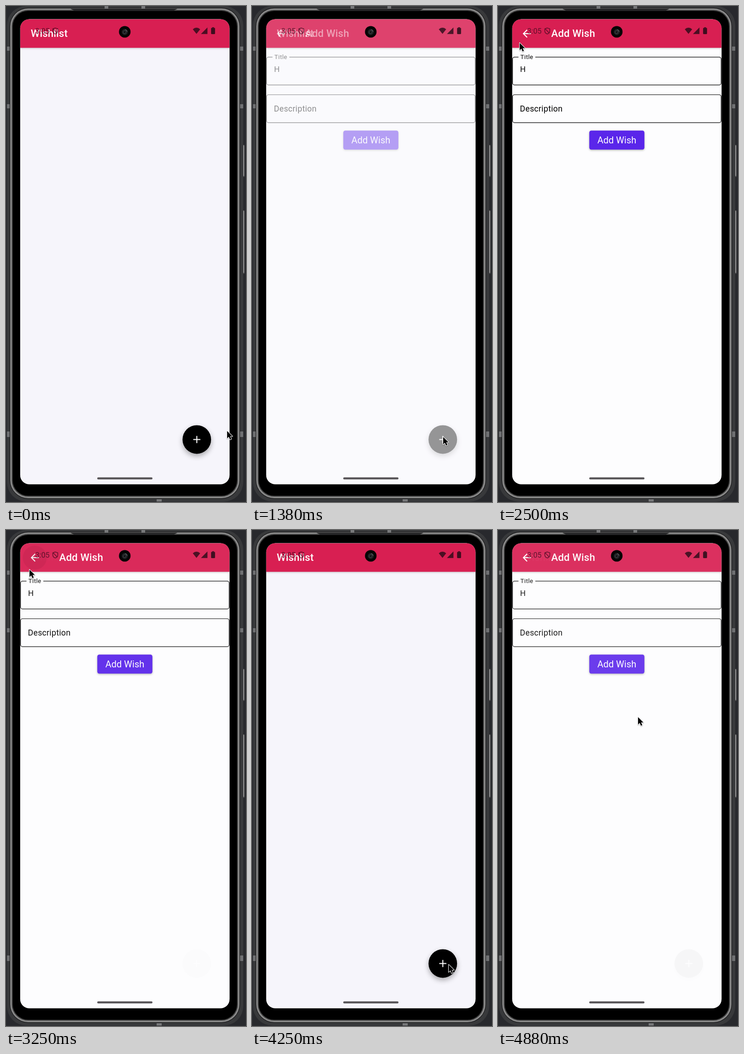
An HTML page with a canvas for the animation above (5.01 s loop, 521 by 1076 pixels).

```html
<!DOCTYPE html>
<html lang="en">
<head>
<meta charset="utf-8">
<title>Wishlist</title>
<style>
html, body { margin: 0; width: 100%; height: 100%; overflow: hidden; background: #28292d; }
canvas { display: block; width: 521px; height: 1076px; }
</style>
</head>
<body>
<canvas id="stage" width="521" height="1076"></canvas>
<script>
const W = 521, H = 1076, LOOP = 5010;
const PINK = '#d81f52';
const SCREEN = { x: 30.8, y: 28.5, w: 454.5, h: 1009, r: 20 };
const ctx = document.getElementById('stage').getContext('2d');

function layer(draw) {
  const c = document.createElement('canvas');
  c.width = W;
  c.height = H;
  draw(c.getContext('2d'));
  return c;
}

function box(g, x, y, w, h, r, fill) {
  g.beginPath();
  g.roundRect(x, y, w, h, r);
  if (fill) {
    g.fillStyle = fill;
    g.fill();
  }
}

function disc(g, x, y, r, fill) {
  g.beginPath();
  g.arc(x, y, r, 0, Math.PI * 2);
  g.fillStyle = fill;
  g.fill();
}

function text(g, str, x, y, size, color, weight = 400, spacing = 0) {
  g.font = `${weight} ${size}px Roboto, sans-serif`;
  g.letterSpacing = spacing + 'px';
  g.fillStyle = color;
  g.fillText(str, x, y);
}

function shadow(g, color, blur, dy) {
  g.shadowColor = color;
  g.shadowBlur = blur;
  g.shadowOffsetY = dy;
}

function icon(g, path, x, y, scale, color) {
  g.save();
  g.translate(x, y);
  g.scale(scale, scale);
  g.fillStyle = color;
  g.fill(new Path2D(path));
  g.restore();
}

// Metal rim, from the outside in: inset from the side, colour
const RIM = [
  [0, '#161617'], [1, '#6c6c6c'], [2, '#979797'], [3.5, '#7a7a7a'],
  [4.5, '#4c4c4c'], [6, '#1f1f1f'], [7, '#000']
];

// Phone hardware around the screen
const phone = layer(g => {
  g.fillStyle = '#28292d';
  g.fillRect(0, 0, W, H);
  for (const [y, h] of [[301, 70], [443, 138]]) {
    box(g, 513, y, 5, h, 2, '#4d4d4e');
    box(g, 514, y + 1, 3, h - 3, 1.5, '#929292');
  }
  box(g, 2, 0, 513, 1075, 42, '#38393b');
  for (const [y, h] of [[88, 9], [213, 9], [923, 12]]) {
    box(g, 2, y, 7, h, 0, '#6f7072');
    box(g, 508, y, 7, h, 0, '#6f7072');
  }
  for (const [inset, color] of RIM) {
    const dx = 8 + inset, dy = 4 + inset;
    box(g, dx, dy, 516 - dx * 2, 1073 - dy * 2, 40 - inset, color);
  }
  box(g, 214, 0, 8, 7, 0, '#77787a');
  box(g, 294, 0, 8, 7, 0, '#77787a');
  box(g, 327, 1070, 11, 5, 0, '#77787a');
  g.beginPath();
  g.moveTo(140, 6);
  g.lineTo(372, 6);
  g.lineTo(362, 11);
  g.lineTo(150, 11);
  g.fillStyle = '#242426';
  g.fill();
});

function appBar(g, bg) {
  g.fillStyle = bg;
  g.fillRect(SCREEN.x, SCREEN.y, SCREEN.w, SCREEN.h);
  g.save();
  shadow(g, 'rgba(0,0,0,.2)', 4, 1.2);
  g.fillStyle = PINK;
  g.fillRect(SCREEN.x, SCREEN.y, SCREEN.w, 62.2);
  g.restore();
}

const listPage = layer(g => {
  appBar(g, '#f6f5fb');
  text(g, 'Wishlist', 53.8, 67, 22.1, '#fff', 500, 0.16);
  g.save();
  shadow(g, 'rgba(0,0,0,.32)', 12, 5);
  disc(g, 414.2, 940.4, 31, '#000');
  g.restore();
  g.fillStyle = '#fff';
  g.fillRect(406.5, 939.4, 15.5, 2.1);
  g.fillRect(413.2, 932.7, 2.1, 15.5);
});

function field(g, y) {
  box(g, 31.6, y, 452.8, 60.6, 4.4);
  g.strokeStyle = '#000';
  g.lineWidth = 1.2;
  g.stroke();
}

const BACK = 'M20 11H7.83l5.59-5.59L12 4l-8 8 8 8 1.41-1.41L7.83 13H20v-2z';

const addPage = layer(g => {
  appBar(g, '#fdfdfe');
  icon(g, BACK, 49.2, 46.7, 1.105, '#fff');
  text(g, 'Add Wish', 115.6, 67, 22.1, '#fff', 500, 0.16);
  field(g, 110.8);
  g.fillStyle = '#fdfdfe';
  g.fillRect(44.5, 108, 36.5, 6);
  text(g, 'Title', 48.6, 114.7, 13.3, '#000', 400, 0.44);
  text(g, 'H', 48, 142.8, 16.8, '#000');
  field(g, 192.5);
  text(g, 'Description', 47.6, 229, 17.7, '#000', 400, 0.28);
  g.save();
  shadow(g, 'rgba(0,0,0,.3)', 4, 1.5);
  box(g, 198.2, 270.3, 119.6, 41.2, 4.4, '#5a26ea');
  g.restore();
  text(g, 'Add Wish', 215.8, 298, 19.9, '#fff', 400, 0.05);
});

function statusBar(g) {
  const dark = 'rgba(30,6,18,.64)';
  text(g, '3:05', 63.5, 59.6, 16.2, dark);
  g.strokeStyle = dark;
  g.lineWidth = 1.5;
  g.stroke(new Path2D('M107 47.6l5.4 2v4.6q0 4.6-5.4 6.6q-5.4-2-5.4-6.6v-4.6zM102.5 49.5l9 9.5'));
  g.fillStyle = 'rgba(20,8,16,.72)';
  g.fill(new Path2D('M405.5 50.4Q413.5 43.6 421.5 50.4L413.5 60.6z'));
  g.fill(new Path2D('M437.3 46.6V60.8H423.2z'));
  box(g, 445.2, 47.6, 8.6, 13.4, 1.4, 'rgba(20,8,16,.78)');
  g.fillRect(447.6, 46, 3.8, 1.6);
}

function camera(g) {
  disc(g, 257.8, 56, 12.6, '#050505');
  disc(g, 257.8, 56.4, 6.6, '#1d1e20');
  disc(g, 257.2, 57, 4.2, '#2e2f33');
  g.strokeStyle = '#5b5c60';
  g.lineWidth = 1.5;
  g.beginPath();
  g.arc(257.8, 56.4, 5, -1.5, -0.1);
  g.stroke();
  disc(g, 257.4, 56.6, 1.8, '#0d0d0f');
}

function cursor(g, x, y) {
  g.save();
  g.translate(x + 1, y + 1);
  const p = new Path2D('M0 0V16L3.7 12.6L6.3 18.6L9.2 17.3L6.6 11.5H11.6z');
  shadow(g, 'rgba(0,0,0,.35)', 2, 1);
  g.lineJoin = 'round';
  g.lineWidth = 2;
  g.strokeStyle = '#fff';
  g.stroke(p);
  g.shadowColor = 'transparent';
  g.fillStyle = '#000';
  g.fill(p);
  g.restore();
}

// Pointer path: time, x, y
const PATH = [
  [0, 479, 921], [125, 477, 922], [500, 402, 940], [750, 397, 939],
  [1000, 414, 934], [1375, 414, 934], [1750, 21, 12], [1875, 38, 60],
  [2125, 46, 79], [2500, 46, 79], [2875, 24, 68], [3125, 50, 85],
  [3700, 50, 85], [4125, 426, 942], [4500, 426, 942], [4875, 303, 405]
];

const smooth = k => k * k * (3 - 2 * k);
const clamp = k => Math.min(1, Math.max(0, k));

function pointer(t) {
  const i = Math.max(1, PATH.findIndex(p => p[0] >= t));
  const [t0, x0, y0] = PATH[i - 1], [t1, x1, y1] = PATH[i];
  const k = smooth(clamp((t - t0) / (t1 - t0)));
  return [x0 + (x1 - x0) * k, y0 + (y1 - y0) * k];
}

// cubic-bezier(.4, 0, .2, 1)
function ease(x) {
  let lo = 0, hi = 1;
  for (let i = 0; i < 24; i++) {
    const s = (lo + hi) / 2, r = 1 - s;
    if (1.2 * s * r * r + 0.6 * s * s * r + s ** 3 < x) lo = s;
    else hi = s;
  }
  return 3 * lo * lo * (1 - lo) + lo ** 3;
}

const fade = (t, start) => ease(clamp((t - start) / 700));

function page(img, alpha) {
  if (alpha < 0.002) return;
  ctx.globalAlpha = alpha;
  ctx.drawImage(img, 0, 0);
  ctx.globalAlpha = 1;
}

function draw(t) {
  const add = clamp(fade(t, 1150) - fade(t, 3150) + fade(t, 4438));
  ctx.drawImage(phone, 0, 0);

  ctx.save();
  box(ctx, SCREEN.x, SCREEN.y, SCREEN.w, SCREEN.h, SCREEN.r, '#fff');
  ctx.clip();
  // The lower page lingers a little under the upper one
  page(listPage, (1 - add) ** 0.6);
  page(addPage, add);
  const press = clamp((t - 3080) / 120) * clamp((3850 - t) / 300);
  if (press > 0) disc(ctx, 62.5, 60, 26, `rgba(60,0,20,${0.07 * press})`);
  statusBar(ctx);
  box(ctx, 198, 1022.5, 120, 4.4, 2.2, '#5a575a');
  ctx.restore();

  camera(ctx);
  cursor(ctx, ...pointer(t));
}

function tick(now) {
  const t = now % LOOP;
  const step = Math.floor(t / 250) * 2 + (t % 250 >= 130 ? 1 : 0);
  draw(Math.min(step, 39) * 125);
  requestAnimationFrame(tick);
}
tick(performance.now());
</script>
</body>
</html>
```
